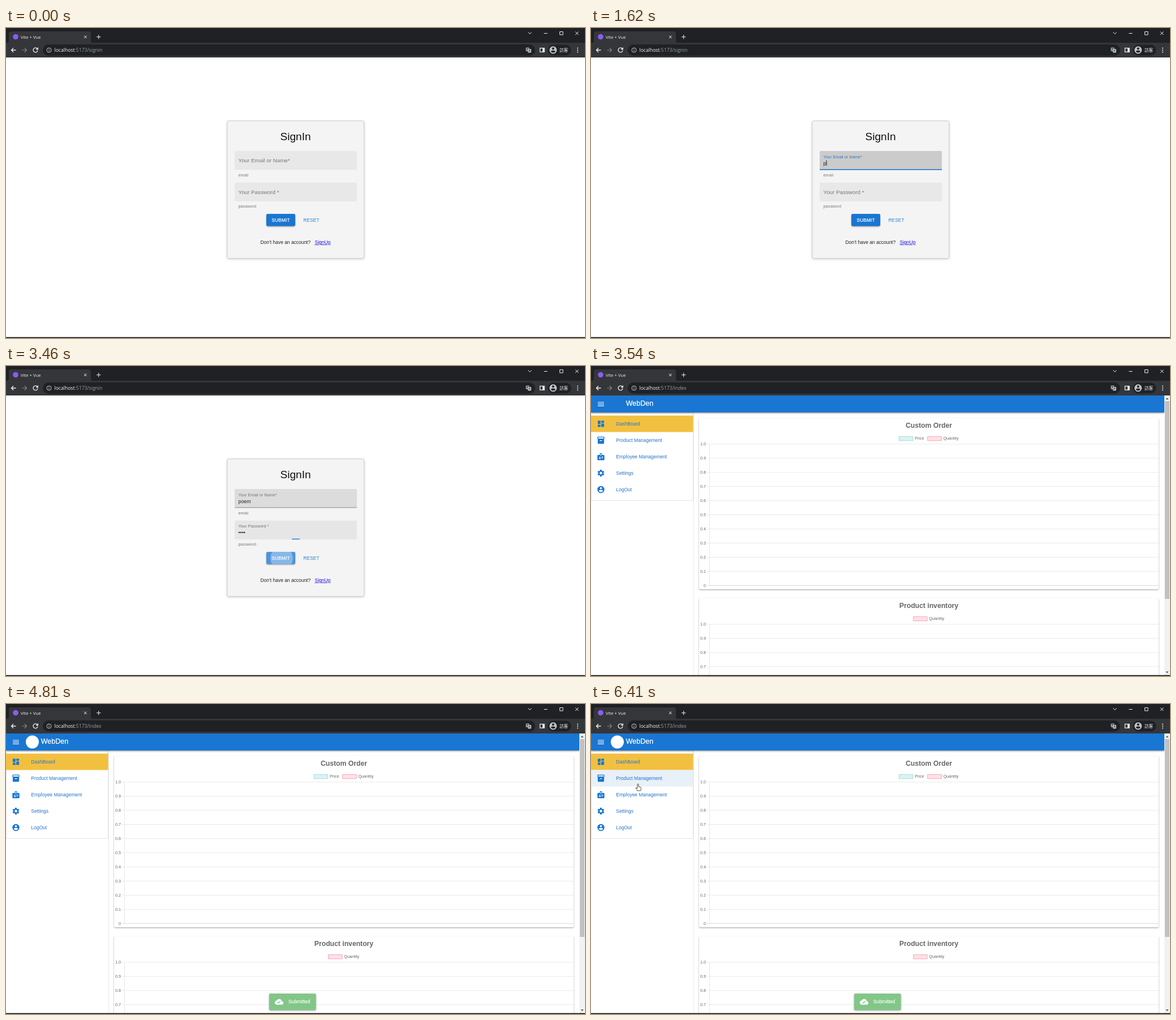
Write an HTML page that moves like this. It is 1023x547 px and loops after 8000 ms.

```html
<!DOCTYPE html>
<html lang="en">
<head>
<meta charset="utf-8">
<title>Sign in</title>
<style>
  html, body { margin: 0; width: 100%; height: 100%; overflow: hidden; background: #fff; }
  svg { display: block; width: 1023px; height: 547px; }
  text { font-family: "Liberation Sans", Arial, sans-serif; white-space: pre; }
  .ui text { font-family: "Open Sans", "Noto Sans", sans-serif; }
  .ui .cjk { font-family: "Noto Sans CJK TC", "Noto Sans CJK", "Noto Sans CJK JP", sans-serif; }
  .line { fill: none; stroke: #f1f3f4; stroke-width: 1; }
  .card { fill: #fff; filter: drop-shadow(0 1px 1.2px #0006); }
</style>
</head>
<body>
<svg id="stage" viewBox="0 0 1023 547"></svg>
<script>
const LOOP = 8000, BLUE = '#1976d2';
const stage = document.getElementById('stage');

const rect = (x, y, w, h, fill, more = '') =>
  `<rect x="${x}" y="${y}" width="${w}" height="${h}" fill="${fill}" ${more}/>`;
const text = (x, y, size, fill, str, more = '') =>
  `<text x="${x}" y="${y}" font-size="${size}" fill="${fill}" ${more}>${str}</text>`;
const line = (d, more = '') => `<path class="line" d="${d}" ${more}/>`;
const icon = (cx, cy, scale, fill, d) =>
  `<path transform="translate(${cx} ${cy}) scale(${scale}) translate(-12 -12)" fill="${fill}" fill-rule="evenodd" d="${d}"/>`;

const ICONS = {
  board: 'M3 13h8V3H3v10zm0 8h8v-6H3v6zm10 0h8V11h-8v10zm0-18v6h8V3h-8z',
  box: 'M20 2H4c-1 0-2 .9-2 2v3c0 .7.4 1.3 1 1.7V20c0 1.1 1.1 2 2 2h14c.9 0 2-.9 2-2V8.7c.6-.4 1-1 1-1.7V4c0-1.1-1-2-2-2zm-5 12H9v-2h6v2zm5-7H4V4h16v3z',
  badge: 'M20 7h-5V4a2 2 0 0 0-2-2h-2a2 2 0 0 0-2 2v3H4a2 2 0 0 0-2 2v11a2 2 0 0 0 2 2h16a2 2 0 0 0 2-2V9a2 2 0 0 0-2-2zM11 4h2v5h-2zM9 12a1.5 1.5 0 1 1 0 3a1.5 1.5 0 0 1 0-3zm3 6H6v-.7q0-1.8 3-1.8t3 1.8zm6-1.500h-4V15h4zm0-3h-4V12h4z',
  gear: 'M19.1 12.9a7 7 0 0 0 0-1.800l2-1.600a.5.5 0 0 0 .1-.6l-1.900-3.300a.5.5 0 0 0-.6-.2l-2.400 1a7 7 0 0 0-1.600-1l-.4-2.500a.5.5 0 0 0-.5-.4h-3.800a.5.5 0 0 0-.5.4l-.4 2.500a7 7 0 0 0-1.600 1l-2.400-1a.5.5 0 0 0-.6.2L2.700 8.900a.5.5 0 0 0 .1.6l2 1.600a7 7 0 0 0 0 1.800l-2 1.600a.5.5 0 0 0-.1.6l1.900 3.300c.1.2.4.3.6.2l2.400-1a7 7 0 0 0 1.600 1l.4 2.500c0 .2.2.4.5.4h3.800c.3 0 .5-.2.5-.4l.4-2.500a7 7 0 0 0 1.600-1l2.400 1c.2.1.5 0 .6-.2l1.900-3.300a.5.5 0 0 0-.1-.6zM12 15.600a3.600 3.600 0 1 1 0-7.200a3.600 3.600 0 0 1 0 7.200z',
  person: 'M12 2a10 10 0 1 0 0 20a10 10 0 0 0 0-20zm0 3a3 3 0 1 1 0 6a3 3 0 0 1 0-6zm0 14.200a7.200 7.200 0 0 1-6-3.200c0-2 4-3.100 6-3.100s6 1.100 6 3.100a7.200 7.200 0 0 1-6 3.200z',
  cloud: 'M19.350 10.040C18.670 6.590 15.640 4 12 4 9.110 4 6.600 5.640 5.350 8.040 2.340 8.360 0 10.910 0 14c0 3.310 2.690 6 6 6h13c2.760 0 5-2.240 5-5 0-2.640-2.050-4.780-4.650-4.960zM10 17l-3.500-3.500 1.410-1.410L10 14.170 15.180 9l1.410 1.410L10 17z'
};

function browser() {
  return `<g class="ui">
    ${rect(0, 0, 1023, 27, '#202124')}${rect(0, 26, 1023, 26, '#35363a')}
    <path fill="#35363a" d="M2 26q3 0 3-3V10q0-4 4-4H146q4 0 4 4V23q0 3 3 3Z"/>
    <circle cx="17" cy="15.500" r="4.800" fill="#8b5cf6"/>
    ${text(26, 18.800, 7.700, '#f1f3f4', 'Vite + Vue')}
    ${line('M138 13.500l4.500 4.500m0-4.500l-4.500 4.500M160 15.700h7.400m-3.700-3.700v7.400', 'stroke-width="1.200"')}
    ${line('M922.500 7.500l3 3 3-3M950.500 9.500h6M978.500 6.500h5.500v5.500h-5.500zM1006 6.500l5.500 5.500m0-5.500l-5.500 5.500')}
    ${line('M17.500 39H9.500m3.700-3.800L9.500 39l3.700 3.800M55.300 36.500a4 4 0 1 0 .7 3.200M56.300 34.500v3h-3', 'style="stroke-width:1.300"')}
    ${line('M28.500 39h8m-3.700-3.800l3.700 3.800-3.700 3.800', 'style="stroke:#85878a;stroke-width:1.200"')}
    ${rect(65, 29, 870, 20, '#202124', 'rx="10"')}
    <circle class="line" cx="76" cy="39" r="4" style="stroke:#bdc1c6"/>
    ${line('M76 38.300v3M76 36.500v1', 'style="stroke:#bdc1c6"')}
    <text x="85.500" y="41.800" font-size="8.600" fill="#f1f3f4">localhost<tspan id="path" fill="#9aa0a6"></tspan></text>
    ${rect(918.500, 34.500, 6, 6.500, '#9aa0a6', 'rx="1"')}${rect(922, 37, 6, 6.500, '#bdc1c6', 'rx="1"')}
    ${line('M920 36.500h3m-1.500 0v2.500M923.500 41.800l1.500-3.500 1.500 3.500', 'style="stroke:#303134;stroke-width:.8"')}
    ${rect(943.500, 35.500, 7.500, 6.800, 'none', 'stroke="#f1f3f4" stroke-width="1.200"')}${rect(948, 35.500, 3.500, 7, '#f1f3f4')}
    ${rect(957.500, 29.500, 41, 19, '#202124', 'rx="9.500"')}
    ${icon(966.700, 38.800, .66, '#bdc1c6', ICONS.person)}
    ${text(978, 41.700, 7.500, '#f1f3f4', '訪客', 'class="cjk"')}
    ${[35.500, 39, 42.500].map(y => `<circle cx="1010" cy="${y}" r="1" fill="#f1f3f4"/>`).join('')}
  </g>`;
}

function field(id, y, label, help) {
  return `<g id="${id}" transform="translate(0 ${y})">
    ${rect(404, 0, 216, 33.300, '#e8e8e8', 'class="bg" rx="2"')}
    ${rect(404, 32.500, 216, .8, '#777', 'class="rule" opacity="0"')}
    ${rect(404, 32, 216, 1.400, BLUE, 'class="bar"')}
    ${text(410.500, 20, 9.800, '#777', label, 'class="label"')}
    ${text(410.500, 24.700, 8.800, '#222', '', 'class="value"')}
    ${rect(410, 16.500, .9, 9.500, '#111', 'class="caret"')}
    ${text(410.500, 44.500, 7.200, '#777', help, 'letter-spacing=".1"')}
  </g>`;
}

function signIn() {
  return `<g id="signin">
    ${rect(391, 164, 241.500, 242.500, '#f4f4f4', 'rx="2.500" stroke="#ccc" stroke-width=".9" style="filter:drop-shadow(0 1.500px 2px #0003)"')}
    ${text(511.500, 197.500, 19.100, '#111', 'SignIn', 'text-anchor="middle"')}
    ${field('user', 217, 'Your Email or Name*', 'email')}
    ${field('pass', 272.700, 'Your Password *', 'password')}
    ${rect(460, 328, 51, 21.500, BLUE, 'rx="2.400" style="filter:drop-shadow(0 1px 1px #0006)"')}
    <clipPath id="button">${rect(460, 328, 51, 21.500, '#000', 'rx="2.400"')}</clipPath>
    <g clip-path="url(#button)" fill="#fff">
      <circle id="wave" cx="485.500" cy="339" opacity=".22"/><circle id="pulse" cx="487" cy="339" opacity=".33"/>
    </g>
    ${text(469.500, 341.800, 8.200, '#fff', 'SUBMIT', 'letter-spacing=".23" stroke="#fff" stroke-width=".2"')}
    ${text(525.500, 341.800, 8.200, '#2f7fd0', 'RESET', 'letter-spacing=".15"')}
    ${text(449.500, 381, 8.450, '#222', 'Don’t have an account?')}
    ${text(545.500, 381, 8.500, '#1a10e0', 'SignUp', 'text-decoration="underline"')}
  </g>`;
}

function chart(top, title, legend) {
  const first = top + 45.800, step = 24.950;
  let out = rect(191, top, 812, 302, '#fff', 'rx="2" class="card"')
    + text(597, top + 16.700, 12.200, '#666', title, 'text-anchor="middle" font-weight="bold"');
  for (const [x, name, fill, stroke] of legend)
    out += rect(x + .5, top + 32.300, 24.500, 7.400, fill, `stroke="${stroke}"`) + text(x + 28.300, top + 38, 7.200, '#666', name);
  for (let i = 0; i <= 10; i++) {
    const y = first + i * step;
    out += rect(205, y - .4, 798, .8, i < 10 ? '#e5e5e5' : '#d0d0d0')
      + text(203, y + 2.300, 7.200, '#666', i < 10 ? (1 - i / 10).toFixed(1) : 0, 'text-anchor="end"');
  }
  return out + rect(209, first, .8, step * 10, '#e2e2e2');
}

function dashboard() {
  const items = [['DashBoard', 'board'], ['Product Management', 'box'], ['Employee Management', 'badge'],
    ['Settings', 'gear'], ['LogOut', 'person']];
  const price = ['Price', '#dbf2f2', '#a5dcdc'], count = ['Quantity', '#ffe0e6', '#f5a9b8'];
  return `<g id="dash">
    ${rect(181, 83, .8, 463, '#e6e6e6')}
    ${rect(.4, 83, 180.200, 154.300, '#fff', 'stroke="#ddd" stroke-width=".8"')}
    ${rect(0, 87.500, 180.500, 29, '#f2c040')}
    ${rect(1, 0, 179.500, 29, '#e8f0f8', 'id="hover"')}
    ${items.map(([name, key], i) => icon(17.500, 102 + i * 29, .62, BLUE, ICONS[key])
      + text(44.300, 105 + i * 29, 8.500, '#2474c8', name)).join('')}
    ${chart(92, 'Custom Order', [[543.700, ...price], [594.200, ...count]])}
    ${chart(410, 'Product inventory', [[569, ...count]])}
    ${rect(0, 52, 1013, 30, BLUE, 'style="filter:drop-shadow(0 1px 1.500px #0007)"')}
    ${line('M12 64h11M12 67.200h11M12 70.400h11', 'style="stroke:#fff;stroke-width:1.200"')}
    <circle id="logo" cx="46.500" cy="67" r="11.500" fill="#fff"/>
    ${text(61.700, 70.300, 12.500, '#fff', 'WebDen', 'stroke="#fff" stroke-width=".25"')}
    ${rect(1013, 52, 10, 494, '#f1f1f1')}${rect(1014, 62, 8, 349, '#c1c1c1')}
    <path fill="#555" d="M1015.500 59h5l-2.500-3zM1015.500 539h5l-2.500 3z"/>
    <g id="toast">
      ${rect(465, 511, 82.500, 29, '#82c787', 'rx="2" style="filter:drop-shadow(0 1px 1.500px #0006)"')}
      ${icon(482.500, 525.500, .63, '#fff', ICONS.cloud)}
      ${text(499, 528.300, 8.500, '#fff', 'Submitted', 'stroke="#fff" stroke-width=".15"')}
    </g>
    <g id="cursor" fill="#fff" stroke="#222" stroke-width=".8" stroke-linejoin="round">
      <path id="arrow" d="M0 0V10.500L2.400 8.300 4 11.800 5.600 11.100 4.100 7.700H7.400Z"/>
      <path id="hand" d="M-1 1a1 1 0 0 1 2 0V4.800l3.400.8q1.300.4 1.100 1.900L4.700 12H-1L-3.800 7.700q-.3-1.200.9-1L-1 8Z"/>
    </g>
  </g>`;
}

stage.innerHTML = rect(0, 0, 1023, 547, '#fff') + signIn() + dashboard() + browser() + rect(0, 545.500, 1023, 1.500, '#0c0c0c');

const $ = id => document.getElementById(id);
const set = (el, attrs) => { for (const k in attrs) el.setAttribute(k, attrs[k]); };
const show = (el, on) => set(el, { visibility: on ? 'inherit' : 'hidden' });
const lerp = (a, b, p) => a + (b - a) * p;
const grey = v => `rgb(${v},${v},${v})`;

// CSS-style cubic-bezier easing
function bezier(x1, y1, x2, y2) {
  const at = (a, b, s) => 3 * a * s * (1 - s) ** 2 + 3 * b * s * s * (1 - s) + s ** 3;
  return t => {
    if (t <= 0 || t >= 1) return t <= 0 ? 0 : 1;
    let lo = 0, hi = 1;
    for (let i = 0; i < 20; i++) {
      const mid = (lo + hi) / 2;
      if (at(x1, x2, mid) < t) lo = mid; else hi = mid;
    }
    return at(y1, y2, lo);
  };
}
const easeOut = bezier(0, 0, .2, 1), ease = bezier(.25, .1, .25, 1);
const ramp = (t, start, length, fn = easeOut) => fn((t - start) / length);

const keys = [[4960, 484, 211], [5150, 484, 211], [5530, 211, 163], [5770, 110, 150], [6010, 70, 148], [6170, 81, 142], [6330, 81, 142], [6410, 83, 141]];
function pointer(t) {
  const i = keys.findIndex(k => k[0] > t);
  if (i < 0) return keys[keys.length - 1].slice(1);
  const [a, b] = [keys[Math.max(i - 1, 0)], keys[i]];
  const p = Math.max(0, (t - a[0]) / (b[0] - a[0]));
  return [lerp(a[1], b[1], p), lerp(a[2], b[2], p)];
}

function drawField(id, t, f) {
  const part = name => $(id).querySelector('.' + name);
  const focus = ramp(t, f.focus, 200) - ramp(t, f.blur, 200);
  const lift = ramp(t, f.focus, 200), hover = f.hover ? ramp(t, f.hover, 200) : 0;
  set(part('bg'), { fill: grey(lerp(lerp(232, 220, hover), 203, focus)) });
  set(part('rule'), { opacity: hover });
  set(part('bar'), { x: 512 - 108 * focus, width: 216 * focus });
  set(part('label'), {
    y: lerp(20, 12.500, lift), 'font-size': lerp(9.800, 7.350, lift),
    fill: `rgb(${lerp(119, 40, focus)},${lerp(119, 125, focus)},${lerp(119, 205, focus)})`
  });
  const value = part('value');
  value.textContent = f.text.slice(0, f.typed.filter(k => t >= k).length);
  set(part('caret'), { x: 410.700 + (value.textContent ? value.getComputedTextLength() : 0) });
  show(part('caret'), f.caret.some(([a, b]) => t >= a && t < b));
}

function draw(t) {
  const inside = t >= 3540;
  show($('signin'), !inside);
  show($('dash'), inside);
  $('path').textContent = inside ? ':5173/index' : ':5173/signin';
  if (!inside) {
    drawField('user', t, {
      focus: 830, blur: 2420, hover: 500, text: 'poem',
      typed: [1620, 1700, 1780, 1860], caret: [[850, 1290], [1620, 2270]]
    });
    drawField('pass', t, {
      focus: 2400, blur: 3327, text: '••••',
      typed: [2580, 2660, 2780, 2890], caret: [[2420, 3220]]
    });
    set($('wave'), { r: 34 * ramp(t, 3290, 170) });
    set($('pulse'), { r: 20 * ramp(t, 3320, 160) });
    return;
  }
  const slide = ramp(t, 3630, 760, ease);
  set($('toast'), { opacity: slide, transform: `translate(0 ${27 * (1 - slide)})` });
  show($('logo'), t >= 4810);
  const [x, y] = pointer(t), over = x < 181;
  set($('cursor'), { transform: `translate(${x} ${y})` });
  show($('cursor'), t >= 4960);
  show($('arrow'), !over);
  show($('hand'), over);
  set($('hover'), { y: 87.500 + 29 * Math.floor((y - 87.500) / 29) });
  show($('hover'), over);
}

const start = performance.now();
function tick() {
  draw((performance.now() - start) % LOOP);
  requestAnimationFrame(tick);
}
tick();
</script>
</body>
</html>
```
